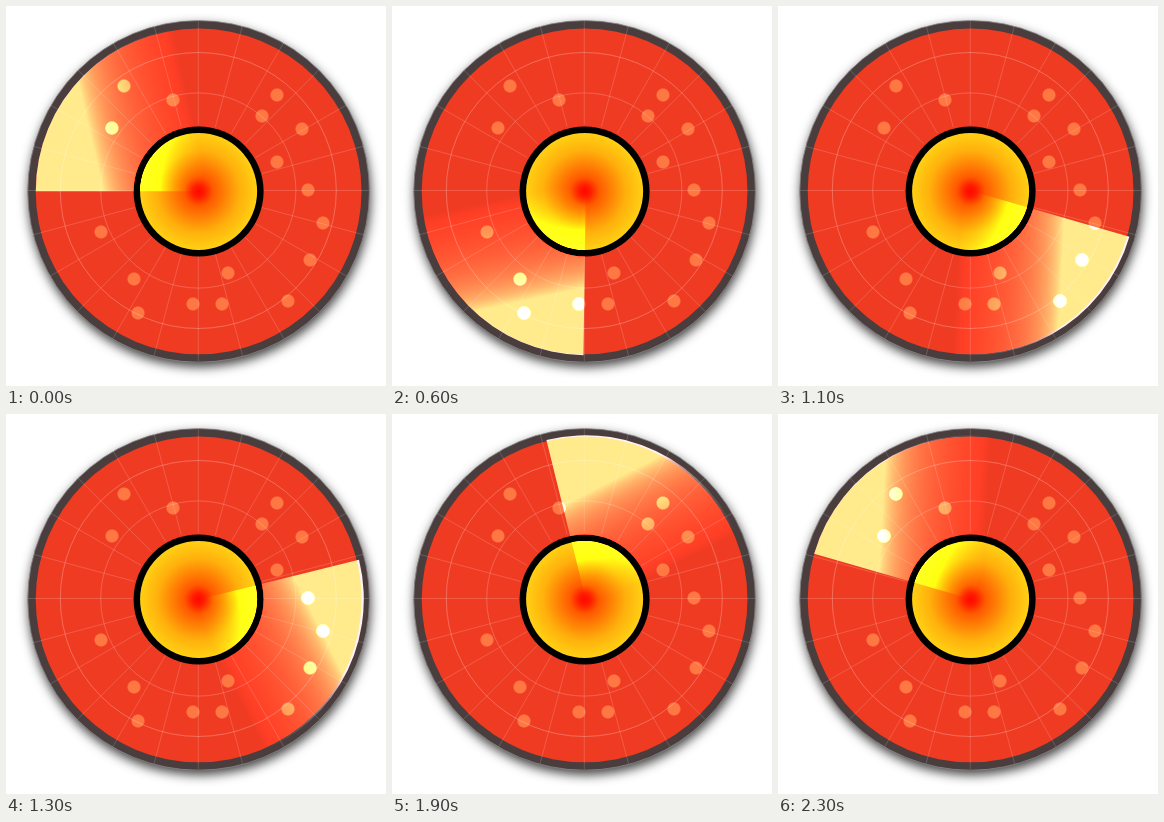
Recreate the animation shown at these times as an HTML page with a canvas. Size 380x380 px, loop 2400 ms.

```html
<!DOCTYPE html>
<html lang="en">
<head>
<meta charset="utf-8">
<title>Radar sweep</title>
<style>
  html, body { margin: 0; width: 100%; height: 100%; overflow: hidden; background: #fff; }
  canvas { display: block; }
</style>
</head>
<body>
<canvas id="radar" width="380" height="380"></canvas>
<script>
const ctx = document.getElementById('radar').getContext('2d');
const TAU = Math.PI * 2, DEG = Math.PI / 180;
const STEPS = 24, STEP_MS = 100;
const dial = { x: 192.6, y: 185.4 };
const grid = { x: 192.3, y: 184.5 };
const beam = { x: 193.8, y: 185.2, r: 164, span: 94 * DEG };
const blips = [
  [118, 80], [167, 94], [106, 122], [271, 89], [256, 110], [296, 123],
  [271, 156], [302, 184], [317, 217], [304, 254], [282, 295], [222, 267],
  [216, 298], [187, 298], [128, 273], [132, 307], [95, 226]
];

function disc(x, y, r, fill) {
  ctx.beginPath();
  ctx.arc(x, y, r, 0, TAU);
  ctx.fillStyle = fill;
  ctx.fill();
}

function ring({ x, y }, r, color) {
  ctx.beginPath();
  ctx.arc(x, y, r, 0, TAU);
  ctx.strokeStyle = color;
  ctx.stroke();
}

function radial(x, y, r, stops) {
  const g = ctx.createRadialGradient(x, y, 0, x, y, r);
  for (const [pos, color] of stops) g.addColorStop(pos, color);
  return g;
}

function drawDial() {
  ctx.fillStyle = '#fff';
  ctx.fillRect(0, 0, 380, 380);
  ctx.save();
  ctx.shadowColor = 'rgba(0,0,0,0.75)';
  ctx.shadowBlur = 11;
  ctx.shadowOffsetX = 1;
  ctx.shadowOffsetY = 4.5;
  disc(dial.x, dial.y, 171, '#493d3d');
  ctx.restore();
  ring(dial, 170.8, 'rgba(150,145,145,0.7)');
  disc(dial.x, dial.y, 162.9, '#f03b23');
}

function drawGrid() {
  ring(grid, 138, 'rgba(255,255,255,0.25)');
  ring(grid, 97.6, 'rgba(255,255,255,0.2)');
  ctx.strokeStyle = 'rgba(255,255,255,0.16)';
  ctx.beginPath();
  for (let a = 0; a < 360; a += 15) {
    const c = Math.cos(a * DEG), s = Math.sin(a * DEG);
    ctx.moveTo(grid.x + 66 * c, grid.y + 66 * s);
    ctx.lineTo(grid.x + 171 * c, grid.y + 171 * s);
  }
  ctx.stroke();
}

function drawBlips() {
  for (const [x, y] of blips) {
    disc(x, y, 7.2, radial(x, y, 7.2, [
      [0.8, 'rgb(255,119,66)'], [1, 'rgba(255,119,66,0)']
    ]));
  }
}

function drawHub() {
  const { x, y } = dial;
  disc(x, y, 65, '#000');
  disc(x, y, 58.5, radial(x, y, 58.5, [
    [0, '#ff0800'], [0.1, '#ff1c00'], [0.25, '#ff5a00'], [0.7, '#ffb00c'], [1, '#ffd014']
  ]));
}

// Brightens what lies below, more strongly toward the rim ahead of the edge
function drawSweep(edge) {
  const { x, y, r, span } = beam;
  const axis = edge - 13 * DEG;
  const dx = Math.cos(axis), dy = Math.sin(axis);
  const g = ctx.createLinearGradient(x - 10 * dx, y - 10 * dy, x + 94 * dx, y + 94 * dy);
  g.addColorStop(0, '#000');
  g.addColorStop(1, '#bfbfbf');
  ctx.save();
  ctx.globalCompositeOperation = 'color-dodge';
  ctx.beginPath();
  ctx.moveTo(x, y);
  ctx.arc(x, y, r, edge, edge + span);
  ctx.fillStyle = g;
  ctx.fill();
  ctx.restore();
}

function draw(ms) {
  const step = Math.floor(ms / STEP_MS) % STEPS;
  const lag = 1.1 * Math.min(step / 8, 1);
  drawDial();
  drawBlips();
  drawHub();
  drawSweep((180 - step * 360 / STEPS + lag) * DEG);
  drawGrid();
}

let start;
function tick(now) {
  if (start === undefined) start = now;
  draw(Math.max(0, now - start));
  requestAnimationFrame(tick);
}
draw(0);
requestAnimationFrame(tick);
</script>
</body>
</html>
```
